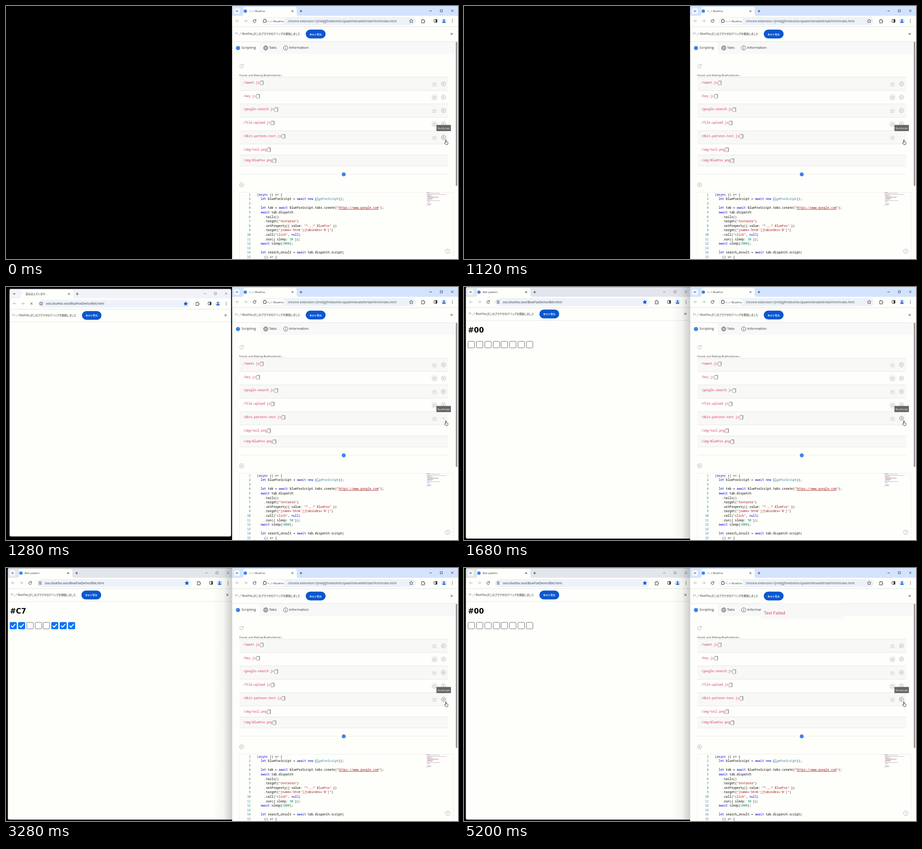
An HTML page that plays this animation: 968 px wide and 544 px high, repeating every 5520 ms.

```html
<!DOCTYPE html>
<html lang="en">
<head>
<meta charset="utf-8">
<title>8bit pattern test</title>
<style>
html, body { margin: 0; width: 100%; height: 100%; overflow: hidden; background: #000; }
svg { display: block; width: 968px; height: 544px; }
text { font-family: "Open Sans", "Noto Sans CJK JP", "Noto Sans CJK", sans-serif; white-space: pre; }
.jp { font-family: "Noto Sans CJK JP", "Noto Sans CJK", sans-serif; font-feature-settings: "palt"; }
.mono { font-family: "Noto Sans Mono", monospace; }
.head { font-family: "DejaVu Sans", sans-serif; font-weight: bold; }
</style>
</head>
<body>
<svg id="stage" viewBox="0 0 968 544"></svg>
<script>
const WHITE = '#fefffb', INK = '#30343a', GRAY = '#a2a2a2', BLUE = '#0b57d0', LOGO = '#3f82e8';
const LOOP = 5520, TICK = 80, OPEN = 1200, SETTLED = 1360, LOADED = 1520, COUNT = 2124, DONE = 3680;

const rect = (x, y, w, h, fill, rx = 0, more = '') =>
  `<rect x="${x}" y="${y}" width="${w}" height="${h}" fill="${fill}" rx="${rx}" ${more}/>`;
const path = (d, stroke = INK, w = 1, fill = 'none') =>
  `<path d="${d}" stroke="${stroke}" stroke-width="${w}" fill="${fill}"/>`;
const disc = (x, y, r, fill, stroke = 'none', w = 1) =>
  `<circle cx="${x}" cy="${y}" r="${r}" fill="${fill}" stroke="${stroke}" stroke-width="${w}"/>`;
const text = (x, y, s, size, fill = INK, cls = '', more = '') =>
  `<text x="${x}" y="${y}" font-size="${size}" fill="${fill}" class="${cls}" ${more}>${s}</text>`;
const group = (id, body, more = '') => `<g id="${id}" ${more}>${body}</g>`;
const cross = (x, y, r, c = INK, w = 1) =>
  path(`M${x - r} ${y - r}l${2 * r} ${2 * r}m0 ${-2 * r}l${-2 * r} ${2 * r}`, c, w);
const play = (x, y, c = GRAY) =>
  disc(x, y, 4.6, 'none', c, .8) + path(`M${x - 1.3} ${y - 2}l3.3 2l-3.3 2z`, c, .7);
const reload = (x, y, r, c, w) =>
  path(`M${x + r * .8} ${y - r * .6}A${r} ${r} 0 1 0 ${x + r} ${y + r * .2}M${x + r} ${y - r * 1.1}v${r * .7}h${-r * .8}`, c, w);

// Browser frame; both windows share the same horizontal layout.
function browser(w, bottom, bar, frame, ctl, star) {
  const mid = (44 + bar) / 2;
  return rect(4, 0, w, bottom, WHITE, 3) + rect(4, 0, w, 24, frame, 3) +
    rect(4, 21, w, 24, WHITE) +
    path('M24 21q4 0 4-4V6q0-4 4-4H138q4 0 4 4V17q0 4 4 4z', 'none', 0, WHITE) +
    rect(7.5, 4.5, 13, 13, '#f0f5fe', 4) + path('M12 9.8l2 2l2-2', INK, 1.1) +
    cross(133, 11, 1.8) + path('M148.5 11h5.4M151.2 8.3v5.4') +
    path('M426.5 10.5h5', ctl, .9) + rect(449.5, 8, 4.6, 4.6, 'none', .5, `stroke="${ctl}" stroke-width=".9"`) +
    cross(475.2, 10.3, 2.4, ctl, .9) +
    path('M18.5 32h-6.5m3-3l-3 3l3 3M29.5 32h6.5m-3-3l3 3l-3 3', '#a9abad', .9) +
    rect(66, 24, 331, 17, '#edf2fa', 8.5) +
    path('M387.3 28.2l1.2 2.7l2.9.3l-2.2 1.9l.7 2.9l-2.6-1.5l-2.6 1.5l.7-2.9l-2.2-1.9l2.9-.3z', star ? BLUE : INK, .8, star ? BLUE : 'none') +
    path('M409.5 30h2v-1.2h1.8v1.2h2.2v2.2h1v1.8h-1v2.3h-6v-2.2q1.4-.8 0-2z', INK, 1) +
    rect(436.2, 28.8, 6.4, 6.4, 'none', .8, `stroke="${INK}"`) + rect(439.6, 28.8, 3, 6.4, INK) +
    disc(457.4, 32.3, 5.6, '#d3e3fd') + disc(457.4, 30.4, 1.7, BLUE) + path('M453.9 35.8q0-2.8 3.5-2.8t3.5 2.8z', 'none', 0, BLUE) +
    [29.3, 32.2, 35.1].map(y => disc(475.5, y, .8, INK)).join('') +
    path(`M4 44.5h${w}M4 ${bar}h${w}`, '#dcdfe1', .8) +
    text(10, mid + 2.2, '「^.,.^ BlueFox」がこのブラウザのデバッグを開始しました', 5.75, INK, 'jp') +
    rect(161.5, mid - 9.6, 42.4, 19.2, BLUE, 9.6) +
    text(182.7, mid + 2.3, 'キャンセル', 5.8, '#fff', 'jp', 'text-anchor="middle" font-weight="700"') +
    cross(474, mid - .3, 2.1);
}

function leftWindow() {
  const boxes = Array.from({ length: 8 }, (_, i) => {
    const x = Math.round(8 + 17.87 * i) + .5;
    return rect(x, 116.9, 14, 14, '#fff', 2, 'stroke="#707070"') +
      group('bit' + i, rect(x - .5, 116.4, 15, 15, '#0075ff', 2) + path(`M${x + 2.6} 124.1l3 3.2l6-7`, '#fff', 2));
  }).join('');
  return group('win', browser(482, 541, 72, 'currentColor', '#777', true) +
    rect(4, .3, 482, 540.7, 'none', 3, 'stroke="#8d9094" stroke-width=".7"') +
    text(83, 34.6, 'ooo.bluefox.ooo/BlueFoxDemo/8bit.html', 6.65) +
    group('loading', text(39, 13.3, '読み込んでいます...', 5.6, INK, 'jp') +
      path('M29.5 9.5a3 3 0 0 1 2-1', '#8a98aa', .7) + cross(51.5, 32.2, 2.2) +
      disc(72.7, 32.2, 3.4, 'none', INK, .9) + path('M72.7 31.6v2.4m0-4.1v1', INK, .9)) +
    group('page', disc(32, 11, 3.6, LOGO) + text(40, 13.2, '8bit pattern', 5.8) + reload(51.8, 32.2, 3, INK, 1) +
      path('M69.8 30.4h2m2.4 0h2.3M69.8 34.2h2.3m2.4 0h2', INK, .9) + disc(73, 30.4, 1.1, 'none', INK, .8) + disc(73.4, 34.2, 1.1, 'none', INK, .8) +
      `<text id="hex" class="head" x="8.5" y="98" font-size="15.3"></text>` + boxes) +
    group('shade', rect(444, 0, 41, 541, 'url(#shadow)')));
}

const CODE = `(async () => {
  let blueFoxScript = await new BlueFoxScript();

  let tab = await blueFoxScript.tabs.create("https://www.google.com");
  await tab.dispatch
    .tails()
    .target("textarea")
    .setProperty({ value: "^.,.^ BlueFox" })
    .target("[name='btnK'][tabindex='0']")
    .call("click", null)
    .run({ sleep: 50 });
  await sleep(1000);

  let search_result = await tab.dispatch.script(
    () => {`.split('\n');

const paint = line => line.replace(/(".*?")|\b(async|let|await|new|null)\b|\b(BlueFoxScript)\b|\b(\d+)\b|=>/g,
  (m, str, key, type, num) => {
    const color = str ? '#a31515' : key ? '#0000e8' : type ? '#267f99' : num ? '#098658' : '#000';
    return `<tspan fill="${color}">${m.replace('>', '&gt;')}</tspan>`;
  });

function editor() {
  const lines = CODE.map((line, i) => {
    const y = 407.7 + 9.58 * i;
    return text(524, y, i + 1, 6.47, '#237893', 'mono', 'text-anchor="end"') + text(537.5, y, paint(line), 6.47, '#000', 'mono');
  }).join('');
  const map = CODE.concat(['      return 1;', '    });', '', '  for (let row of', '    search_result)', '      show(row);', '})();']).map((line, i) => {
    const pad = line.search(/\S/);
    const color = /"/.test(line) ? '#c59a9a' : /let|await|async/.test(line) ? '#9c9cc8' : '#b3b3b8';
    return pad < 0 ? '' : rect(899.5 + pad * .65, 401 + i * 1.32, (line.length - pad) * .62, .7, color);
  }).join('');
  return rect(500, 400.5, 458, 150, WHITE, 0, 'stroke="#e8e8e8" stroke-width=".7"') + lines + map +
    path('M661 418.2h12', '#267f99', .5) + path('M712.4 437.4h85.5', '#a31515', .8) +
    disc(946, 527.5, 4.8, WHITE, GRAY, .8) + text(946, 529.8, '?', 6.4, '#888', '', 'text-anchor="middle"');
}

function fileRows() {
  const names = ['tweet.js', 'key.js', 'google-search.js', 'file-upload.js', '8bit-pattern-test.js', 'img/tail.png', 'img/BlueFox.png'];
  return names.map((name, i) => {
    const y = i < 5 ? 153 + 28.75 * i : 296.7 + 23.6 * (i - 5), h = i < 5 ? 28.75 : 23.6;
    const end = 508 + 3.885 * (name.length + 1), mid = y + 14.3;
    let s = rect(500, y, 447, h, i % 2 ? WHITE : '#f8f8f6') + path(`M500 ${y}h447`, '#e3e3e1', .8) +
      text(508, y + 13.9, '/' + name, 6.47, '#d9345f', 'mono') +
      path(`M${end + 2.2} ${y + 8.2}h5.8v8.2`, '#777', .9) + rect(end + 1.2, y + 8.6, 6, 8, WHITE, .4, 'stroke="#888" stroke-width=".8"');
    if (i < 5) {
      if (i % 2) s += disc(917.5, mid, 7.4, '#f4f4f2');
      s += path(`M915.8 ${mid - 2}h-1.6v6.2h6.8v-6.2h-1.6M917.6 ${mid - 3.6}v5m-1.5-1.4l1.5 1.5l1.5-1.5`, '#b0b0b0', .65);
      s += i < 4 ? play(937, mid) : group('run', play(0, 0, '#777'));
    }
    return s;
  }).join('') + path('M500 343.9h447', '#e3e3e1', .8);
}

function rightWindow() {
  return `<g transform="translate(480.5 0)">` + browser(484, 560, 76.5, '#d3e3fd', INK, false) +
    rect(68.5, 25.7, 49, 13.6, WHITE, 6.8) +
    path('M71 29.5h1.8v-1.2h1.8v1.2h1.7v2h1v1.7h-1v2.2h-5.3z', INK, 1) +
    text(79.5, 34.5, '^.,.^ BlueFox', 6.1) + disc(32, 11, 3.6, LOGO) + text(40.5, 13.2, '^.,.^ BlueFox', 5.8) +
    reload(51.8, 32.2, 3, INK, 1) + '</g>' +
    text(603.8, 34.6, 'chrome-extension://jmkijijjfimebohbccipaahimknabkfe/tab/html/index.html', 6.64, '#474b50') +
    rect(485, 77, 478, 26, '#f8f8f8') + rect(485, 77, 58.5, 26, WHITE) +
    disc(496.8, 90.4, 4.5, LOGO) + text(504.3, 92.4, 'Scripting', 7.57) +
    disc(556.2, 90.2, 4.7, 'none', '#444', .8) +
    path('M551.5 90.2h9.4M552.5 87.7h7.4M552.5 92.7h7.4M556.2 85.5q-4.6 4.7 0 9.4q4.6-4.7 0-9.4', '#444', .6) +
    text(563.5, 92.4, 'Tabs', 7.57) +
    disc(599, 90.2, 4.7, 'none', '#444', .8) + path('M599 89.3v3.6m0-5.6v1', '#444', .9) +
    text(606.2, 92.4, 'Information', 7.57) +
    rect(963.4, 77, 3, 310, '#8c8c8c', 1.5) +
    reload(504.6, 129.3, 3.8, GRAY, .8) +
    text(499.7, 150.7, 'Found, and Waiting BlueFoxServer...', 5.6, '#444') + fileRows() +
    path('M500 361.6h211M735 361.6h212', '#e1e1df', .8) + disc(723.3, 362, 4.3, LOGO) +
    play(504.6, 384.5) + editor() +
    rect(921.8, 255.8, 31, 13.2, '#666', 1) + text(937.3, 264.6, 'RunScript', 5.8, '#fff', '', 'text-anchor="middle"') +
    path('M941.3 294.2v-5.6q0-1 .8-1t.8 1v3.3q.7-.6 1.3.2q.8-.5 1.3.4q1-.2 1 .8v2.3q0 2.6-2.4 2.6h-1.5q-1.2 0-2-1.6l-1.5-2.3q.3-1.2 2.2-.1z', '#111', .8, '#fff') +
    group('toast', rect(635.7, 76.3, 176.5, 33.8, '#f8f8f6') + text(642.5, 99.5, 'Test Failed', 9.3, '#d43660'));
}

const shadow = `<linearGradient id="shadow"><stop stop-opacity="0"/>
  <stop offset=".55" stop-opacity=".04"/><stop offset="1" stop-opacity=".2"/></linearGradient>`;
document.getElementById('stage').innerHTML = shadow + rect(0, 0, 968, 544, '#000') +
  group('opening', rect(21.8, 22, 442.2, 494.5, '#808080', 3)) + leftWindow() +
  rect(484.3, 0, 484, 544, '#c9d4e4') + rightWindow();

const $ = id => document.getElementById(id);
const show = (id, on) => $(id).setAttribute('visibility', on ? 'inherit' : 'hidden');
const move = (id, value) => $(id).setAttribute('transform', value);

function draw(now) {
  let t = Math.floor(now % LOOP / TICK) * TICK;
  if (t % 400 === 240) t -= TICK;

  const settled = t >= SETTLED;
  show('opening', t === OPEN);
  show('win', t > OPEN);
  show('shade', t > OPEN && settled);
  move('win', settled ? '' : 'translate(3.8 4) scale(.984)');
  $('win').style.color = settled ? '#e2e6ec' : '#f1f3f8';
  show('loading', t > OPEN && t < LOADED);
  show('page', t >= LOADED);

  const n = t < COUNT || t >= DONE ? 0 : Math.min(255, Math.round((t - COUNT) * .172));
  $('hex').textContent = '#' + n.toString(16).toUpperCase().padStart(2, '0');
  for (let i = 0; i < 8; i++) show('bit' + i, t >= LOADED && n >> (7 - i) & 1);

  const running = t >= 160 && t < DONE, phase = (t - 1120) / 1360;
  const size = running ? Math.abs(Math.sin(Math.PI * phase)) : 1;
  move('run', `translate(937 282.4) rotate(${running ? 360 * phase : 0}) scale(${size})`);

  show('toast', t >= DONE);
  $('toast').setAttribute('opacity', Math.min(1, (t - DONE + TICK) / 160));
}

let start;
function loop(now) {
  start ??= now;
  draw(now - start);
  requestAnimationFrame(loop);
}
draw(0);
requestAnimationFrame(loop);
</script>
</body>
</html>
```
